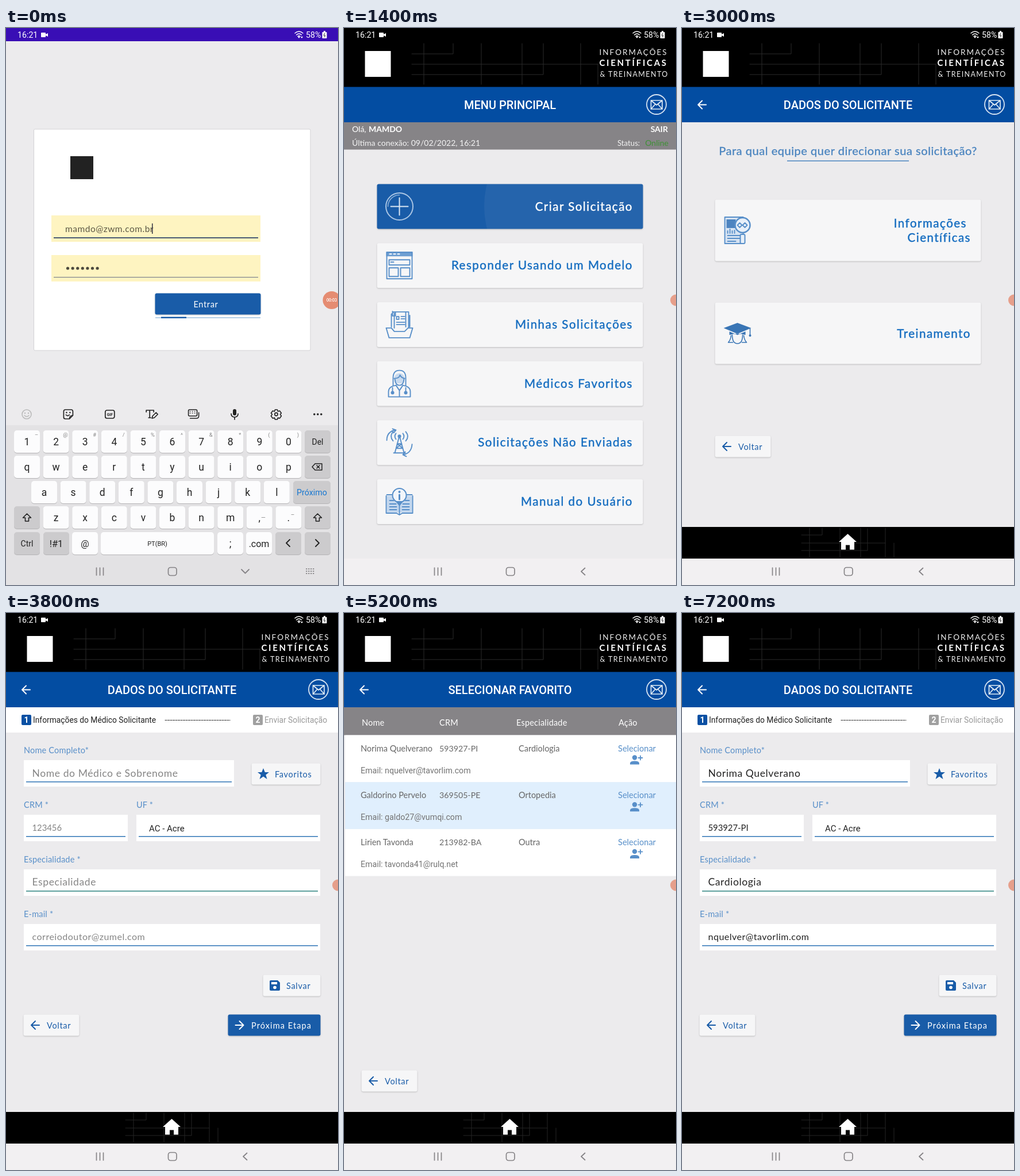
Animation, 578 px wide and 969 px high, one loop 8 s. Source, as an HTML page:

```html
<!DOCTYPE html>
<html lang="pt-BR">
<head>
<meta charset="utf-8">
<title>Solicitações</title>
<style>
html, body { margin: 0; width: 100%; height: 100%; overflow: hidden; background: #ecebed; }
svg { display: block; width: 100%; height: 100%; font-family: Lato, "Open Sans", sans-serif; }
text { white-space: pre; }
.r { font-family: Roboto, "Noto Sans", sans-serif; }
.m { text-anchor: middle; }
.e { text-anchor: end; }
.line { fill: none; stroke-linecap: round; stroke-linejoin: round; }
.card { filter: drop-shadow(0 1px 1px #0003); }
.menu { letter-spacing: 1.5px; }
</style>
</head>
<body>
<svg id="stage" viewBox="0 0 578 969"></svg>
<script>
const BLUE = '#195ca8', SKY = '#156dc0', SOFT = '#588fc9', GREY = '#868487';

const rect = (x, y, w, h, fill, o = '') => `<rect x="${x}" y="${y}" width="${w}" height="${h}" fill="${fill}" ${o}/>`;
const text = (x, y, s, size, fill, o = '') => `<text x="${x}" y="${y}" font-size="${size}" fill="${fill}" ${o}>${s}</text>`;
const path = (d, color, w = 2, o = '') => `<path class="line" d="${d}" stroke="${color}" stroke-width="${w}" ${o}/>`;
const fill = (d, color) => `<path d="${d}" fill="${color}"/>`;
const circle = (x, y, r, color, o = '') => `<circle cx="${x}" cy="${y}" r="${r}" fill="${color}" ${o}/>`;
const at = (x, y, s) => `<g transform="translate(${x} ${y})">${s}</g>`;
const group = (id, s) => `<g id="${id}">${s}</g>`;
const card = (x, y, w, h, color = '#f6f6f7') =>
  rect(x - .5, y - .5, w + 1, h + 1, color, 'rx="3" class="card"');
const label = (x, y, s, color = SKY) =>
  text(x, y, s, 20.5, color, `class="menu e" stroke="${color}" stroke-width=".45"`);
const arrow = (x, y, color, dir = -1, s = 7) =>
  path(`M${x - s} ${y}h${2 * s}M${x} ${y - s}L${x + dir * s} ${y}L${x} ${y + s}`, color);

/* Status and navigation bars */
const status = text(20, 17, '16:21', 14.2, '#fff', 'class="r"') +
  rect(61, 8, 8, 8, '#fff', 'rx="1"') + fill('M69 11l4-2v6l-4-2z', '#fff') +
  path('M503 9q7-6 14 0M505.5 12q4.5-4 9 0M508 14.5q2-2 4 0', '#fff', 1.3) +
  fill('M508 15h4l-2 3zM513 15h4l-2 3z', '#fff') +
  text(522, 17, '58%', 14.2, '#fff', 'class="r"') +
  rect(550.5, 7, 8, 11, '#fff', 'rx="1"') + rect(553, 5, 3, 3, '#fff') +
  path('M555 9l-2 4h3l-2 3', '#333', 1);

const recents = path('M157.5 939v13M163.5 939v13M169.5 939v13', GREY, 1.7) +
  rect(282.5, 938.5, 14.5, 14, 'none', `rx="4" stroke="${GREY}" stroke-width="1.7"`);

/* Login with keyboard */
const face = {
  smile: circle(0, 0, 8, 'none', 'stroke="#bbb" stroke-width="1.6"') + circle(-3, -2, 1.2, '#bbb') +
    circle(3, -2, 1.2, '#bbb') + path('M-4 2q4 4 8 0', '#bbb', 1.5),
  sticker: path('M-8-5q0-3 3-3h10q3 0 3 3v7l-6 6h-7q-3 0-3-3zM2 8q0-6 6-6M-4 1q3 3 6 0', '#222', 1.7) +
    circle(-3, -3, 1.2, '#222') + circle(3, -3, 1.2, '#222'),
  clip: rect(-8, -7, 16, 14, 'none', 'rx="3" stroke="#222" stroke-width="1.7"') +
    text(0, 2.5, 'GIF', 6.5, '#222', 'class="r m" font-weight="700"'),
  pen: path('M-9-4v-3h13v3M-3-7v13M-5 6h4M1 7l1-4l6-6l3 3l-6 6z', '#222', 1.7),
  keys: rect(-8, -8, 15, 11, 'none', 'rx="2" stroke="#222" stroke-width="1.6"') +
    path('M-5-5h.1M-1-5h.1M3-5h.1M-5-2h.1M-1-2h.1M3-2h.1M-5 7h11q4 0 4-4v-6', '#222', 1.6),
  mic: rect(-3, -9, 6, 11, '#222', 'rx="3"') + path('M-6-1q0 6 6 6t6-6M0 5v4', '#222', 1.7),
  gear: path('M-2-8h4l1 3l3-1l3 4l-2 2l2 3l-3 4l-3-1l-1 3h-4l-1-3l-3 1l-3-4l2-3l-2-2l3-4l3 1z', '#222', 1.6) +
    circle(0, 0, 2.6, 'none', 'stroke="#222" stroke-width="1.6"'),
  more: [-6, 0, 6].map(x => circle(x, 0, 1.8, '#222')).join('')
};
const tools = Object.values(face).map((s, i) => at(36 + i * 72.4, 672, s)).join('');

function key(x, y, s, w = 45, dark = false, size = 17.5, color = '#222') {
  return rect(x, y, w, 39, dark ? '#cccbcd' : '#fcfcfd', 'rx="5" style="filter:drop-shadow(0 1px 0 #0003)"') +
    text(x + w / 2, y + 20 + size * .36, s, size, color, 'class="r m"');
}
const row = (s, x, y) => [...s].map((c, i) => key(x + i * 50.6, y, c)).join('');
const shift = x => key(x, 832, '', 45, true) + path(`M${x + 22.5} 845l-7 7h4v6h6v-6h4z`, '#222', 1.6);
const keyboard = rect(0, 691, 578, 278, '#e3e2e4') + tools +
  row('1234567890', 14, 700) + row('qwertyuiop', 14, 744) + row('asdfghjkl', 44, 788) + row('zxcvbnm,.', 64.6, 832) +
  [...'–@#/%^&*()'].map((c, i) => text(53 + i * 50.6, 711, c.replace('&', '&amp;'), 9.5, '#888', 'class="r m"')).join('') +
  text(448, 855, '—', 10, '#888', 'class="r m"') + text(499, 850, '–', 10, '#888', 'class="r m"') +
  key(520, 700, 'Del', 45, true, 14) + key(520, 744, '', 45, true) +
  path('M533 763.5l5-5.5h12v11h-12zM541 761l5 5M546 761l-5 5', '#222', 1.5) +
  key(500, 788, 'Próximo', 65, true, 14.3, '#1777d1') + shift(14) + shift(520) +
  key(14, 877, 'Ctrl', 45, true, 14) + key(65, 877, '!#1', 45, true, 16.5) + key(115, 877, '@', 45, false, 16) +
  key(165, 877, 'PT(BR)', 197, false, 11) + key(368, 877, ';') + key(418, 877, '.com', 45, false, 16) +
  key(469, 877, '', 45, true) + key(520, 877, '', 45, true) +
  path('M494 890l-6 6l6 6M539 890l6 6l-6 6', '#222', 1.8) +
  recents + path('M410 942l6.5 6.5l6.5-6.5', GREY, 1.8) +
  path('M523 941h16M523 945h16M523 949h16', GREY, 2, 'stroke-dasharray="0.5 3.5"');

const login = rect(0, 0, 578, 969, '#ecebed') + rect(0, 0, 578, 23, '#390eb5') +
  rect(48.5, 176, 481.5, 385, '#fff', 'rx="2" stroke="#d3d2d5"') +
  rect(112, 223, 40, 40, '#222') +
  rect(79, 326, 364, 46, '#fef4c1') + rect(79, 395, 364, 46, '#fef4c1') +
  text(103, 354.5, 'mamdo@zwm.com.br', 15.5, '#5d5845', 'letter-spacing=".5"') + rect(254, 340, 1.5, 18, '#334') +
  rect(83, 364, 356, 2, '#4a5a74') + rect(83, 433, 356, 1.2, '#7c828c') +
  [...Array(7)].map((_, i) => circle(107.5 + i * 8.6, 418, 2.6, '#4c493d')).join('') +
  card(260, 462, 183, 36, BLUE) + text(348, 485.5, 'Entrar', 14.5, '#fff', 'class="m" letter-spacing=".7"') +
  rect(260, 503, 183, 2, '#b4cfe7') + `<rect id="progress" y="502.5" height="2.5" fill="${BLUE}"/>` + keyboard;

/* Shared header and footer */
const header = rect(0, 0, 578, 103, '#000') +
  path('M118 45h72v-18M118 63h324M118 81h229v-54M139 27v71M239 27v71M310 27v71M412 27v71M442 63v35', '#2b2b2b', 1) +
  rect(36.5, 40, 45, 45, '#fff') +
  text(444.5, 47, 'INFORMAÇÕES', 13.5, '#eee', 'letter-spacing="2"') +
  text(444.5, 66, 'CIENTÍFICAS', 15, '#fff', 'font-weight="700" letter-spacing="2.7"') +
  text(445.5, 84.5, '&amp; TREINAMENTO', 12.5, '#eee', 'letter-spacing="1.4"') +
  rect(0, 102.5, 578, 61.5, '#034da2') +
  '<text id="title" x="289" y="141" font-size="20" font-weight="500" fill="#fff" class="r m"></text>' +
  circle(544, 133, 17, 'none', 'stroke="#d5e2f1" stroke-width="1.8"') +
  path('M534.5 126h19.5v15h-19.5zl9.7 8l9.8-8M534.5 141l7-8M554 141l-7-8', '#e2ebf5', 1.7);

const footer = arrow(35, 133.5, '#fff') + rect(0, 868, 578, 55, '#000') +
  path('M208 882h36v-12M208 896h146M208 909h115v-38M222 870v50M275 870v50M311 870v50M354 870v50M369 896v24', '#242424', 1) +
  fill('M288.5 880l15.5 14h-4v13.5h-8v-8h-7v8h-8v-13.5h-4z', '#fff');

/* Icons in a 48 pixel box */
const pic = d => path(d, SOFT, 1.9);
const icons = [
  circle(24, 24, 23.5, 'none', 'stroke="#a9c5e4" stroke-width="2"') + path('M24 9v30M9 24h30', '#d9e6f3', 2) +
    path('M4 24a20 20 0 0 1 20-20', '#8fb3da', 1.5),
  rect(1, 0, 46, 8, '#6f9fd2') + path('M7 4h3M14 4h3M21 4h3', '#fff', 2) +
    pic('M2 1h44v46h-44zM6 14h36v9h-36zM6 28h16v15h-16zM26 28h16v15h-16zM9 18h5'),
  pic('M10 28v-22l4-4h26v27M15 4v26M35 2v26M19 10h4v5h-4zM27 10h6M27 14h6M19 20h14M19 24h14M42 8v20M1 30h9l5 6h18l6-6h8l-5 17h-36zM12 1v8h5v-7'),
  circle(24, 15, 9, '#c8daee') +
    pic('M13 27v-13q0-13 11-13t11 13v13M15 15q9 0 10-6q2 5 8 6M16 16q1 11 8 11t8-11M18 27q-13 2-13 11v9h38v-9q0-9-13-11M18 27l6 9l6-9M12 31v7M35 31v7M24 36v11') +
    circle(12, 40, 3, SOFT) + circle(35, 40, 3, SOFT),
  pic('M24 12l-8 30M24 12l8 30M20 26h8M18 34h12M14 42h20M20 26l10 8M28 26l-10 8M18 8q-4 5 0 10M30 8q4 5 0 10M13 5q-7 8 0 16M35 5q7 8 0 16M2 20q0-15 15-18M12 0l6 2l-4 5M46 27q-1 15-15 18M36 48l-6-3l4-5') + circle(24, 13, 3, SOFT),
  rect(2, 14, 44, 29, '#c3d7ee') + pic('M2 12h9M37 12h9M1 14v30h18l5 3l5-3h18v-30M24 31v14M7 22h7M7 28h11M7 33h12M7 38h12M34 22h7M30 28h11M29 33h12M29 38h12') +
    circle(24, 13, 12, '#f2f6fb', `stroke="${SOFT}" stroke-width="2"`) + fill('M17 23h14l-7 9z', SOFT) +
    circle(24, 7, 2, SOFT) + path('M24 12v8', SOFT, 3)
];
const report = rect(2, 1, 33, 46, '#d6e3f2') + pic('M2 1h32v46h-32zM7 33h22M7 38h22M7 43h14M7 29v-4M11 29v-7M15 29v-4M19 29v-5') +
  rect(5, 5, 16, 15, '#4d84c0') + circle(33, 15, 13, '#e8f0f9', `stroke="${SOFT}" stroke-width="2.5"`) +
  pic('M24 15l4-4l4 4l-4 4zM33 15l4-4l4 4l-4 4z') + rect(29, 31, 8, 16, '#e8f0f9', `rx="2" stroke="${SOFT}" stroke-width="2"`);
const graduate = fill('M0 14L24 5l24 9L24 24zM10 20l14 6l14-6v6q-14-5-28 0z', '#3975b5') +
  path('M46 15v11M15 26q0 15 9 15t9-15M13 27q-1 8-5 12h8M35 27q1 8 5 12h-8', '#3975b5', 1.6) + circle(46, 27, 2, '#3975b5');

/* Pages */
const labels = ['Criar Solicitação', 'Responder Usando um Modelo', 'Minhas Solicitações',
  'Médicos Favoritos', 'Solicitações Não Enviadas', 'Manual do Usuário'];
const menu = rect(0, 164, 578, 47.5, GREY) +
  text(14, 180.5, 'Olá,', 14, '#fff') + text(43, 180.5, 'MAMDO', 14, '#fff', 'font-weight="700"') +
  text(564, 180.5, 'SAIR', 14, '#fff', 'class="e" font-weight="700"') +
  text(14, 204.5, 'Última conexão: 09/02/2022, 16:21', 14, '#f4f4f4') +
  text(476, 204.5, 'Status:', 13.2, '#f4f4f4') + text(565, 204.5, 'Online', 14, '#3f9136', 'class="e"') +
  labels.map((s, i) => {
    const y = 272 + i * 102.7;
    return card(58, y, 462, 77, i ? '#f6f6f7' : BLUE) +
      (i ? '' : '<g clip-path="url(#tap)"><circle id="ripple" cx="400" cy="310" fill="#fff" fill-opacity=".05"/></g>') +
      at(72.5, y + 14.5, icons[i]) + label(503, y + 45.5, s, i ? SKY : '#fff');
  }).join('');

const button = (x, y, w, s, color = '#f6f6f7', ink = BLUE, gap = .7) =>
  card(x, y, w, 36, color) + text(x + 40, y + 23.5, s, 14.5, ink, `letter-spacing="${gap}"`);
const back = (x, y) => button(x, y, 96, 'Voltar') + arrow(x + 20, y + 18, BLUE);

const team = rect(0, 164, 578, 704, '#ecebed') +
  text(289, 221, 'Para qual equipe quer direcionar sua solicitação?', 20, '#4a84bf',
    'class="m" letter-spacing=".55" stroke="#4a84bf" stroke-width=".35"') +
  rect(183, 230.5, 212, 1.5, '#4a84bf') + card(58, 299, 462, 106) + card(58, 478, 462, 106) +
  at(72.5, 328, report) + at(72.5, 508, graduate) +
  label(496, 347, 'Informações') + label(503, 371.5, 'Científicas') + label(503, 538.5, 'Treinamento') + back(58, 710);

const step = (x, n, s, color, ink) => rect(x, 177, 17, 18, color, 'rx="2"') +
  text(x + 8.5, 191, n, 14, '#fff', 'class="r m" font-weight="700"') + text(x + 20, 191, s, 13.8, ink, 'class="r"');
const field = (x, y, w, name, line = '#2f74b5') => text(x, y - 12, name, 14.5, SOFT, 'letter-spacing=".2"') +
  rect(x, y, w, 46, '#fff') + rect(x + 4, y + 37, w - 8, 1.5, line);
const values = (name, crm, area, mail, ink) => text(45.5, 285, name, 17.5, ink, 'letter-spacing=".6"') +
  text(45.5, 379, crm, 14.8, ink) + text(45.5, 474, area, 17.5, ink, 'letter-spacing=".6"') +
  text(45.5, 568.5, mail, 16, ink, 'letter-spacing=".5"');

const form = rect(0, 164, 578, 704, '#ecebed') + rect(0, 164, 578, 44, '#fff') +
  step(27, 1, 'Informações do Médico Solicitante', '#0a50a3', '#222') + step(430, 2, 'Enviar Solicitação', '#a0a0a0', '#999') +
  path('M277 186.5h113', '#333', 1.2, 'stroke-dasharray="3 1.5"') +
  field(31, 256, 366, 'Nome Completo*') + field(31, 351, 181, 'CRM *') + field(227, 351, 320, 'UF *') +
  field(31, 446, 516, 'Especialidade *', '#2b817e') + field(31, 541, 516, 'E-mail *') +
  text(249, 379.5, 'AC - Acre', 15, '#222', 'class="r"') +
  button(428, 262, 119, 'Favoritos') +
  fill('M448 270l2.8 7h7.2l-5.7 4.6l2.2 7.4l-6.5-4.4l-6.5 4.4l2.2-7.4l-5.7-4.6h7.2z', BLUE) +
  button(448, 630, 99, 'Salvar') + fill('M459 641q0-2 2-2h12l4 4v12q0 2-2 2h-14q-2 0-2-2z', BLUE) +
  rect(462, 642, 10, 4, '#fff') + circle(468, 651.5, 2.8, '#fff') +
  back(31, 699) + button(387, 699, 160, 'Próxima Etapa', BLUE, '#fff', 1.1) + arrow(406.5, 717, '#fff', 1);

const people = [
  ['Norima Quelverano', '593927-PI', 'Cardiologia', 'nquelver@tavorlim.com'],
  ['Galdorino Pervelo', '369505-PE', 'Ortopedia', 'galdo27@vumqi.com'],
  ['Lirien Tavonda', '213982-BA', 'Outra', 'tavonda41@rulq.net']
];
const list = rect(0, 164, 578, 704, '#ecebed') + rect(0, 164, 578, 48.5, GREY) +
  [[31, 'Nome'], [166, 'CRM'], [300, 'Especialidade'], [478, 'Ação']].map(([x, s]) =>
    text(x, 196, s, 14.5, '#fff', 'letter-spacing=".2"')).join('') +
  people.map(([name, crm, area, mail], i) => at(0, 212.5 + i * 81.7,
    rect(2, 0, 576, 81.7, i == 1 ? '#e0effd' : '#fff') +
    text(29, 28, name, 14.5, '#666') + text(166, 28, crm, 14.2, '#666') + text(304, 28, area, 14.5, '#666') +
    text(29, 66, 'Email: ' + mail, 14.2, '#737373', 'class="r"') + text(510, 28, 'Selecionar', 14.5, SOFT, 'class="m"') +
    circle(506, 39, 4.2, SOFT) + fill('M498 51v-2q0-4 8-4t8 4v2z', SOFT) + path('M516 36v7M512.5 39.5h7', SOFT, 1.8)
  )).join('') + back(31, 796);

document.getElementById('stage').innerHTML =
  '<clipPath id="tap"><rect x="57.5" y="271.5" width="463" height="78" rx="3"/></clipPath>' +
  rect(0, 0, 578, 969, '#ecebed') +
  group('app', rect(0, 0, 578, 20, '#c9c8ca') + group('nav', rect(0, 923, 578, 46, '#f2f0f2')) +
    recents + path('M419.5 939.5l-6.5 6l6.5 6', GREY, 1.8) +
    group('header', header) + group('footer', footer) + group('team', team) + group('menu', menu) +
    group('form', form) +
    group('blank', values('Nome do Médico e Sobrenome', '123456', 'Especialidade', 'correiodoutor@zumel.com', '#858585')) +
    group('filled', values(...people[0], '#222')) + group('list', list)) +
  group('login', login) + status +
  '<circle id="rec" cy="473.5" fill="#e58c72"/><text id="clock" x="567" y="476" font-size="7" font-weight="700" fill="#fff" class="m"></text>';

const $ = id => document.getElementById(id);
const show = (id, on) => $(id).style.display = on ? '' : 'none';
const set = (id, attrs) => { for (const k in attrs) $(id).setAttribute(k, attrs[k]); };

function draw(now) {
  const t = Math.floor(now % 8000 / 200) * 200; // the screen refreshes five times a second
  const within = (a, b) => t >= a && t < b;

  show('login', t < 600);
  show('app', t >= 600);
  show('menu', within(600, 1800));
  show('team', within(1600, 3800));
  show('footer', t >= 1600);
  show('form', within(3800, 5200) || t >= 7200);
  show('blank', within(3800, 5200));
  show('filled', t >= 7200);
  show('list', within(5200, 7200));

  const drop = `translate(0 ${within(600, 800) ? 19 : 0})`;
  set('header', { transform: drop });
  set('menu', { transform: drop, opacity: t >= 1600 ? .3 : 1 });
  set('nav', { transform: drop });
  $('title').textContent = t < 1600 ? 'MENU PRINCIPAL'
    : within(4800, 7200) ? 'SELECIONAR FAVORITO' : 'DADOS DO SOLICITANTE';

  const p = Math.min(t / 400, 1);
  const left = 270 - 35 * p + 130 * p * p, right = 314 + 132 * p - 20 * p * p;
  set('progress', { x: left, width: right - left });
  set('ripple', { r: t < 1200 ? 0 : 39 + 117 * Math.min((t - 1200) / 200, 1) });

  const hide = Math.max(0, Math.min((t - 800) / 400, 1));
  set('rec', { cx: 567 + 11 * hide, r: 15.5 - 5.5 * hide, opacity: 1 - .2 * hide });
  show('clock', !hide);
  $('clock').textContent = t < 200 ? '00:03' : '00:04';
  requestAnimationFrame(draw);
}
requestAnimationFrame(draw);
</script>
</body>
</html>
```
